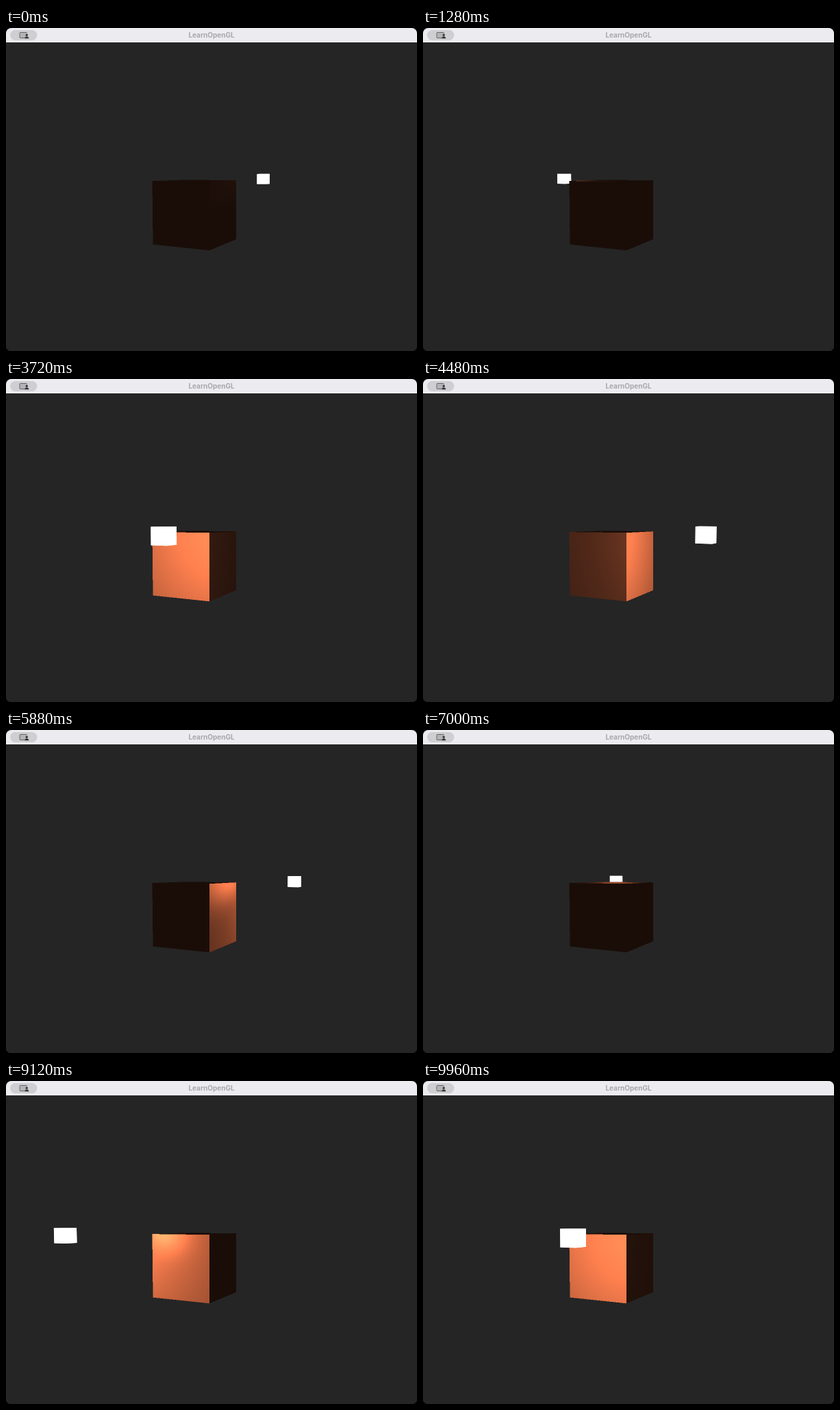
Animation, 600 px wide and 471 px high, one loop 10000 ms. Source, as an HTML page with a canvas:

```html
<!DOCTYPE html>
<html lang="en">
<head>
<meta charset="utf-8">
<title>LearnOpenGL</title>
<style>
  html, body { margin: 0; width: 100%; height: 100%; overflow: hidden; background: #000; }
  #win { position: absolute; left: 0; top: 0; width: 600px; height: 471px; border-radius: 8px 8px 7px 7px; overflow: hidden; background: #252525; }
  canvas, svg { position: absolute; left: 0; top: 0; display: block; }
  text { font: 700 10px Inter, "Open Sans", sans-serif; fill: #a8a8ab; text-anchor: middle; }
</style>
</head>
<body>
<div id="win">
  <canvas id="view" width="600" height="471"></canvas>
  <svg width="600" height="471" viewBox="0 0 600 471">
    <rect width="600" height="21" fill="#ecebf0"/>
    <rect x="6" y="3" width="39.5" height="15" rx="7.5" fill="#cfcfd2"/>
    <rect x="20" y="6.5" width="10.5" height="8" rx="1" fill="#b4b4b6"/>
    <path d="M27 14.5H21a1 1 0 0 1-1-1V7.5a1 1 0 0 1 1-1h8.5a1 1 0 0 1 1 1" fill="none" stroke="#4a4a4c" stroke-dasharray="1.6 .5"/>
    <circle cx="30.3" cy="10.2" r="1.6" fill="#333335"/>
    <path d="M27.3 15.2c0-4 6-4 6 0z" fill="#333335"/>
    <text x="300" y="13.6">LearnOpenGL</text>
  </svg>
</div>
<script>
const LOOP = 10000, STEP = 40;
const CX = 300, CY = 246, FOCAL = 225 / Math.tan(Math.PI / 8);
const YAW = 26.5 * Math.PI / 180, PITCH = Math.atan(0.0663);
const ORBIT = 2, PHASE = 2.893, LAMP_Y = 0.5, LAMP_HALF = 0.1;
const COLOR = [255, 128, 79], AMBIENT = 0.1, SPECULAR = 0.5, SHINE = 32;

const s = Math.sin(YAW), c = Math.cos(YAW), sp = Math.sin(PITCH), cp = Math.cos(PITCH);
const right = [c, 0, -s];
const up = [-s * sp, cp, -c * sp];
const fwd = [-s * cp, -sp, -c * cp];
const eye = [0.254 * c + 6.035 * s, 0.64, 6.035 * c - 0.254 * s];

const dot = (a, b) => a[0] * b[0] + a[1] * b[1] + a[2] * b[2];
const sub = (a, b) => [a[0] - b[0], a[1] - b[1], a[2] - b[2]];
const unit = a => { const l = Math.hypot(...a); return a.map(v => v / l); };

function project(p) {
  const d = sub(p, eye), k = FOCAL / dot(d, fwd);
  return [CX + dot(d, right) * k, CY - dot(d, up) * k];
}

// Cube surface is fixed on screen: cast its rays once, at double resolution.
const BOX = { x: 208, y: 214, w: 136, h: 116 }, SS = 2;
const tile = document.createElement('canvas');
tile.width = BOX.w * SS;
tile.height = BOX.h * SS;
const tileCtx = tile.getContext('2d');
const pixels = tileCtx.createImageData(tile.width, tile.height);
const hits = [];

function cast(dir) {
  let near = -Infinity, far = Infinity, axis = 0;
  for (let i = 0; i < 3; i++) {
    const a = (-0.5 - eye[i]) / dir[i], b = (0.5 - eye[i]) / dir[i];
    if (Math.min(a, b) > near) { near = Math.min(a, b); axis = i; }
    far = Math.min(far, Math.max(a, b));
  }
  return near < far ? { p: eye.map((v, i) => v + dir[i] * near), axis } : null;
}

for (let y = 0; y < tile.height; y++) {
  for (let x = 0; x < tile.width; x++) {
    const u = (BOX.x + (x + 0.5) / SS - CX) / FOCAL;
    const v = (CY - BOX.y - (y + 0.5) / SS) / FOCAL;
    const hit = cast(fwd.map((f, i) => f + u * right[i] + v * up[i]));
    if (!hit) continue;
    hit.at = (y * tile.width + x) * 4;
    hit.v = unit(sub(eye, hit.p));
    hits.push(hit);
  }
}

// Phong shading; all visible faces have positive axis normals.
function shadeCube(lamp) {
  const data = pixels.data;
  for (const { p, v, axis, at } of hits) {
    const x = lamp[0] - p[0], y = lamp[1] - p[1], z = lamp[2] - p[2];
    const len = Math.sqrt(x * x + y * y + z * z);
    const facing = (axis === 0 ? x : axis === 1 ? y : z) / len;
    const toEye = (x * v[0] + y * v[1] + z * v[2]) / len;
    const mirror = Math.max(0, 2 * facing * v[axis] - toEye);
    const k = AMBIENT + Math.max(0, facing) + SPECULAR * Math.pow(mirror, SHINE);
    data[at] = COLOR[0] * k;
    data[at + 1] = COLOR[1] * k;
    data[at + 2] = COLOR[2] * k;
    data[at + 3] = 255;
  }
  tileCtx.putImageData(pixels, 0, 0);
}

const ctx = document.getElementById('view').getContext('2d');
ctx.imageSmoothingQuality = 'high';

function drawCube() {
  ctx.drawImage(tile, BOX.x, BOX.y, BOX.w, BOX.h);
}

function drawLamp(lamp) {
  ctx.fillStyle = '#fff';
  for (let axis = 0; axis < 3; axis++) {
    for (const side of [-1, 1]) {
      ctx.beginPath();
      for (const [a, b] of [[-1, -1], [1, -1], [1, 1], [-1, 1]]) {
        const p = lamp.slice();
        p[axis] += side * LAMP_HALF;
        p[(axis + 1) % 3] += a * LAMP_HALF;
        p[(axis + 2) % 3] += b * LAMP_HALF;
        ctx.lineTo(...project(p));
      }
      ctx.fill();
    }
  }
}

function draw(ms) {
  const a = PHASE + ms / 1000;
  const lamp = [ORBIT * Math.sin(a), LAMP_Y, ORBIT * Math.cos(a)];
  const behind = dot(lamp, fwd) > 0;
  ctx.fillStyle = '#252525';
  ctx.fillRect(0, 0, 600, 471);
  shadeCube(lamp);
  if (behind) drawLamp(lamp);
  drawCube();
  if (!behind) drawLamp(lamp);
}

const start = performance.now();
function tick() {
  const t = (performance.now() - start) % LOOP;
  draw(Math.floor(t / STEP) * STEP);
  requestAnimationFrame(tick);
}
tick();
</script>
</body>
</html>
```
